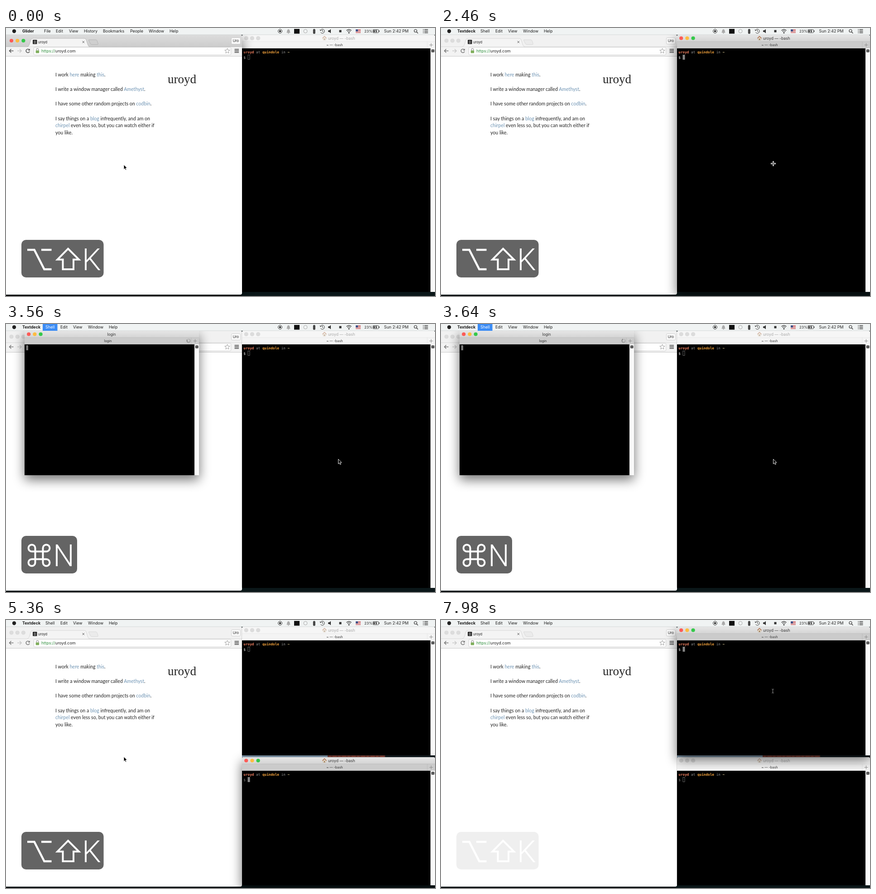
An HTML page that plays this animation: 947x592 px, repeating every 8 s.

```html
<!DOCTYPE html>
<html lang="en">
<head>
<meta charset="utf-8">
<title>Tiling windows</title>
<style>
html, body { margin: 0; width: 100%; height: 100%; overflow: hidden; background: #0b1719; }
svg { display: block; width: 947px; height: 592px; }
text { font-family: Inter, "Open Sans", sans-serif; white-space: pre; }
.page { font-family: Lato, sans-serif; font-size: 10.6px; fill: #222; }
.page .a { fill: #6d93b3; }
.logo { font-family: "Liberation Serif", serif; font-size: 27px; fill: #222; }
.mono { font-family: "DejaVu Sans Mono", monospace; font-size: 7.7px; }
.key { font-family: Roboto, sans-serif; font-weight: 300; font-size: 66px; fill: #fff; }
</style>
</head>
<body>
<svg id="stage" viewBox="0 0 947 592" xmlns="http://www.w3.org/2000/svg"></svg>
<script>
const LOOP = 8000;
const USER = 'uroyd', HOST = 'quindole', APP = 'Glider', SHELL = 'Textdeck';
const stage = document.getElementById('stage');

const DEFS = `<defs>
<filter id="blur" x="-30%" y="-30%" width="160%" height="160%"><feGaussianBlur stdDeviation="13"/></filter>
<linearGradient id="bar" x2="0" y2="1"><stop stop-color="#e6e6e6"/><stop offset="1" stop-color="#d3d3d3"/></linearGradient>
<linearGradient id="strip" x2="0" y2="1"><stop stop-color="#dcdcdc"/><stop offset="1" stop-color="#cdcdcd"/></linearGradient>
</defs>`;

const rect = (x, y, w, h, fill, more = '') =>
  `<rect x="${x}" y="${y}" width="${w}" height="${h}" fill="${fill}" ${more}/>`;
const disc = (x, y, r, fill, more = '') => `<circle cx="${x}" cy="${y}" r="${r}" fill="${fill}" ${more}/>`;
const line = (d, color, w = 1, fill = 'none') =>
  `<path d="${d}" fill="${fill}" stroke="${color}" stroke-width="${w}"/>`;
const text = (x, y, size, str, fill = '#222', more = '') =>
  `<text x="${x}" y="${y}" font-size="${size}" fill="${fill}" ${more}>${str}</text>`;
const mid = 'text-anchor="middle"';

const shadow = (x, y, w, h, on) => on
  ? rect(x, y + 10, w, h, '#000', 'opacity=".55" filter="url(#blur)"')
  : rect(x - 1, y, w + 2, h + 1, '#000', 'opacity=".12" rx="4"');

const lights = (x, y, on) => ['#fc5b57', '#fdbc40', '#34c84a']
  .map((c, i) => disc(x + 13.2 * i, y, 4.1, on ? c : '#dcdcdc', on ? '' : 'stroke="#cfcfcf" stroke-width=".5"')).join('');

function desktop() {
  return rect(0, 0, 947, 592, '#0b1719') + rect(521, 296, 189, 9, '#8299ad') +
    rect(710, 296, 127, 9, '#6b3a34') +
    line('M712 301H836', '#a0503f', 1.5).replace('/>', ' stroke-dasharray="5 4 9 3"/>') +
    rect(837, 296, 110, 9, '#141d21');
}

function browser(on) {
  const ink = on ? '#555' : '#7c7c7c';
  let s = shadow(0, 15, 521, 574, on) + rect(-4, 15, 525, 574, '#fff', 'rx="4"') +
    `<path d="M0 15H517Q521 15 521 19V41H0Z" fill="${on ? 'url(#strip)' : '#f1f1f1'}"/>` +
    rect(0, 41, 521, 21, '#f3f3f3') + line('M0 41.3H521', on ? '#aaa' : '#cfcfcf', .7) +
    line('M0 62.4H521', '#b9b9b9', .8) +
    line('M47 41.6Q50 41 51 38L55 26Q56 23 59 23H173Q176 23 177 26L181 38Q182 41 185 41.6', on ? '#aaa' : '#cacaca', .7, '#f4f4f4') +
    line('M183 26H198Q200 26 201 28L203 34Q204 36.5 202 36.5H189Q187 36.5 186 34L183 28Q182 26 183 26Z', on ? '#aaa' : '#d0d0d0', .7, on ? '#cfcfcf' : '#ebebeb') +
    lights(12, 28, on) +
    rect(59, 26, 9.5, 9.5, '#2b2b2b', 'rx="1"') + text(63.8, 33.5, 7, '0', '#fff', mid) +
    text(71, 33.7, 7.5, USER) + line('M168.6 28.7L173 33.2M173 28.7L168.6 33.2', '#555', 1) +
    rect(497.5, 21.5, 20, 14, '#fafafa', 'rx="2" stroke="#c0c0c0" stroke-width=".7"') +
    text(507.4, 31.2, 7.8, 'Uro', '#222', mid);
  s += line('M16.5 50.5H8M11.5 46.5L7.5 50.5L11.5 54.5', ink, 1.6) +
    line('M25 50.5H33.5M30 46.5L34 50.5L30 54.5', '#c9c9c9', 1.6) +
    line('M51.5 48.2A4 4 0 1 0 52 51.7', ink, 1.6) + `<path d="M52.8 45.5V49.8H48.5Z" fill="${ink}"/>` +
    rect(61.5, 42.5, 435, 17, '#fff', 'rx="2" stroke="#c4c4c4" stroke-width=".8"') +
    rect(65.7, 49.5, 7.4, 6, '#7fae5b', 'rx="1"') + line('M67 50V47.8A2.4 2.4 0 0 1 71.8 47.8V50', '#999', 1.2) +
    `<text x="78" y="53.8" font-size="9" fill="#222"><tspan fill="#2f8f3d">https://</tspan>${USER}.com</text>` +
    line('M488.5 44.8L490.1 48.7L494.2 49L491 51.6L492.1 55.6L488.5 53.4L484.9 55.6L486 51.6L482.8 49L486.9 48.7Z', '#888', .8) +
    line('M504.5 47.2H514M504.5 50.5H514M504.5 53.8H514', '#555', 1.8);
  const link = w => `<tspan class="a">${w}</tspan>`;
  const rows = [
    [106.8, `I work ${link('here')} making ${link('this')}.`],
    [139, `I write a window manager called ${link('Amethyst')}.`],
    [171.3, `I have some other random projects on ${link('codbin')}.`],
    [203.5, `I say things on a ${link('blog')} infrequently, and am on`],
    [219.3, `${link('chirpel')} even less so, but you can watch either if`],
    [235, 'you like.']
  ];
  s += rows.map(([y, t]) => `<text class="page" x="109" y="${y}">${t}</text>`).join('');
  return s + `<text class="logo" x="357" y="122">${USER}</text>`;
}

// A shell window; "login" is its state before the prompt is ready.
function shellWin({ x, y, w, h, on, login, dim, t }) {
  const r = x + w, cx = x + w / 2, tint = on ? '#333' : '#a9a9a9';
  let s = shadow(x, y, w, h, on) + rect(x, y, w, h, '#fff', 'rx="4"') +
    `<path d="M${x} ${y + 16}V${y + 4}q0 -4 4 -4H${r - 4}q4 0 4 4V${y + 16}Z" fill="${on ? 'url(#bar)' : '#f6f6f6'}"/>` +
    rect(x, y + 15, w, 15, on ? '#cbcbcb' : '#f4f4f4') +
    line(`M${x} ${y + 15}H${r}M${r - 17} ${y + 15}V${y + 30}`, on ? '#b2b2b2' : '#dedede', .6) +
    rect(x, y + 30, w - 10, h - 30, '#000') + rect(r - 10, y + 30, 10, h - 30, '#fafafa') +
    lights(x + 9.2, y + 7.5, on) +
    line(`M${r - 12.5} ${y + 22.5}h8m-4 -4v8`, '#888', .9) +
    rect(r - 8, y + 32.5, 6.5, 6, '#222', 'rx="1"') +
    line(`M${r - 7} ${y + 34.5}h4.5m-4.5 2h4.5`, '#ddd', .7);
  if (login) {
    for (let i = 0; i < 10; i++) {
      const a = i * 36 + Math.floor(t / 60) * 36;
      s += `<path d="M0 -2.5V-4.8" transform="translate(${r - 23} ${y + 22}) rotate(${a})" stroke="#333" stroke-width="1" opacity="${.15 + i * .08}"/>`;
    }
    return s + text(cx - .5, y + 10.6, 8.4, 'login', tint, mid) + text(cx - 8.5, y + 25, 7.2, 'login', '#222', mid) +
      rect(x + 3.5, y + 32, 4.5, 11, '#777');
  }
  const hx = cx - 31;
  s += `<g opacity="${on ? 1 : .5}">` + rect(hx - 3, y + 7, 6, 4.5, '#eee3cf', 'stroke="#a58d70" stroke-width=".5"') +
    line(`M${hx - 4.5} ${y + 7.7}l4.5 -4.5l4.5 4.5`, '#b06a42', 1.3) + rect(hx - 1, y + 8.5, 2, 3, '#8d6844') + '</g>' +
    text(cx - 23, y + 10.6, 8.5, `${USER} — -bash`, tint) +
    text(cx - 8.5, y + 25, 7.2, '~ — -bash', '#333', mid) +
    `<text class="mono" x="${x + 3.3}" y="${y + 41}"><tspan fill="#f08060" font-weight="bold">${USER}</tspan>` +
    `<tspan fill="#999"> at </tspan><tspan fill="#f5a33c" font-weight="bold">${HOST}</tspan>` +
    `<tspan fill="#999"> in </tspan><tspan fill="#ecd9a0" font-weight="bold">~</tspan></text>` +
    `<text class="mono" x="${x + 3.3}" y="${y + 52.5}" fill="${dim ? '#777' : '#eee'}">$</text>`;
  return s + (on ? rect(x + 12.5, y + 44, 5, 11, '#858585')
    : rect(x + 13, y + 44.5, 4, 10, 'none', 'stroke="#777" stroke-width=".8"'));
}

const MENUS = {
  [APP]: [['File', 84], ['Edit', 110], ['View', 139], ['History', 172], ['Bookmarks', 214], ['People', 274], ['Window', 315], ['Help', 361]],
  [SHELL]: [['Shell', 87], ['Edit', 120], ['View', 148], ['Window', 181], ['Help', 227]]
};

function menuBar(app, flash) {
  let s = rect(0, 0, 947, 15, '#f0f3f3') + line('M0 14.8H947', '#c2c8c8', .6) + disc(18, 7, 4.2, '#222') +
    text(36, 10.3, 8.9, app, '#1c1c1c', 'font-weight="700"');
  if (flash) s += rect(81, 0, 32.5, 15, '#3b8cf5');
  for (const [name, x] of MENUS[app]) s += text(x, 10.3, 8.9, name, flash && name === 'Shell' ? '#fff' : '#1c1c1c');
  const ink = '#333';
  s += disc(605, 7, 4.4, 'none', `stroke="${ink}"`) + rect(603, 5, 4, 4, ink) +
    `<path d="M619 10.5Q620.5 9 620.5 6Q621 3 623.5 2.5Q626 3 626.5 6Q626.5 9 628 10.5Z" fill="#aaa"/>` + disc(623.5, 11.3, 1.2, '#aaa') +
    rect(636, 2, 12, 10.5, '#111') + disc(661, 7, 4, 'none', 'stroke="#aaa"') +
    rect(677.8, 2, 5, 11, '#444', 'rx="2.5"') +
    line('M694.3 5A4.6 4.6 0 1 1 694.5 9.5M693 3.5L694.2 6L696.5 5M698.5 4V7.2L700.5 8.5', ink, 1) +
    `<path d="M711 5.3H713.5L717 2.5V11.5L713.5 8.7H711Z" fill="${ink}"/>` + rect(735.5, 4.5, 5, 5, ink) +
    line('M751.5 5.6Q757 .8 762.5 5.6M753.5 7.9Q757 4.8 760.5 7.9', ink, 1.3) + disc(757, 10.4, 1.5, ink) +
    rect(772, 3, 11, 8, '#f3efef') + line('M772 3.6H783M772 5.9H783M772 8.2H783M772 10.5H783', '#c64a4e', 1.1) + rect(772, 3, 5, 4.5, '#3e4f86') +
    text(791, 10.2, 8.2, '23%', '#222') +
    rect(810, 3.5, 12.5, 7, 'none', `rx="1" stroke="${ink}" stroke-width=".9"`) + rect(811.2, 4.7, 3, 4.6, ink) +
    `<path d="M818 2.5L814.5 7.5H817L816 11.5L820 6.2H817.5Z" fill="${ink}"/>` + rect(823.2, 5.5, 1.3, 3, ink) +
    text(834.5, 10.3, 8.9, 'Sun 2:42 PM', '#222') +
    disc(904, 6.2, 3, 'none', `stroke="${ink}" stroke-width="1.1"`) + line('M906.2 8.5L909.5 11.7', ink, 1.3) +
    line('M920.5 3.5H922M923.5 3.5H931.5M920.5 7H922M923.5 7H931.5M920.5 10.5H922M923.5 10.5H931.5', ink, 1.3);
  return s;
}

// Shown from, fading from, key.
const KEYS = [[-900, 535, 'K'], [1080, 2490, 'K'], [3200, 4440, 'N'], [5000, 6260, 'K'], [6560, 7764, 'K']];
const FADE = 240;

function keyCaps(t) {
  const k = KEYS.find(([a, b]) => t >= a && t < b + FADE);
  if (!k) return '';
  const alpha = Math.min(1, 1 - (t - k[1]) / FADE);
  const caps = k[2] === 'N'
    ? line('M64.5 495A7.5 7.5 0 1 0 57 502.5H89A7.5 7.5 0 1 0 81.5 495V527A7.5 7.5 0 1 0 89 519.5H57A7.5 7.5 0 1 0 64.5 527Z', '#fff', 4) +
      '<text class="key" x="104" y="535">N</text>'
    : line('M47 490H62.5L84.5 533H100.5M78 490H100.5', '#fff', 4.5) +
      line('M137 487.5L161 511.5H149V533H125.5V511.5H113.5Z', '#fff', 4) +
      '<text class="key" x="168" y="535">K</text>';
  return `<g opacity="${alpha.toFixed(3)}">${rect(34, 468, k[2] === 'N' ? 123 : 181.5, 83, '#646464', 'rx="10"')}${caps}</g>`;
}

const POINTER = [[0, 'arrow', 260, 302], [1300, 'arrow', 733.5, 298.5], [1500, 'plus', 733.5, 299.5],
  [3480, 'arrow', 733.5, 298.5], [5320, 'arrow', 260, 302], [6780, 'arrow', 733.5, 156.5], [6940, 'beam', 732.5, 157]];
const SHAPES = {
  arrow: line('M0 0V10.5L2.4 8.3L4 12L5.8 11.2L4.2 7.6H7.5Z', '#fff', .9, '#000'),
  plus: line('M-5.5 0H5.5M0 -5.5V5.5', '#ddd', 3) + line('M-4.5 0H4.5M0 -4.5V4.5', '#444', 1),
  beam: line('M-2 -4.5Q0 -4.5 0 -3V3Q0 4.5 -2 4.5M2 -4.5Q0 -4.5 0 -3M0 3Q0 4.5 2 4.5', '#aaa', .9)
};

function pointer(t) {
  const [, shape, x, y] = POINTER.filter(p => t >= p[0]).pop();
  return `<g transform="translate(${x} ${y})">${SHAPES[shape]}</g>`;
}

const FOCUS = [[0, 'web'], [1380, 'top'], [3540, 'new'], [5400, 'web'], [6840, 'top']];
const TILED = 3780;

function scene(t) {
  const focus = FOCUS.filter(f => t >= f[0]).pop()[1];
  const tiled = t >= TILED;
  const wins = {
    web: browser(focus === 'web'),
    top: shellWin({ x: 521, y: 15, w: 426, h: tiled ? 284 : 568, on: focus === 'top' })
  };
  if (t >= 3540) {
    const box = tiled ? { x: 521, y: t < 4160 ? 302 : 303, w: 426, h: 283 } : { x: 41, y: 15, w: 385, h: 319, login: true };
    wins.new = shellWin({ ...box, on: focus === 'new', dim: true, t });
  }
  const order = Object.keys(wins).filter(k => k !== focus).concat(focus);
  return DEFS + desktop() + order.map(k => wins[k]).join('') +
    menuBar(focus === 'web' ? APP : SHELL, t >= 3500 && t < 3660) + keyCaps(t) + pointer(t);
}

let last = '';
const start = performance.now();
function draw(now) {
  const next = scene(Math.max(0, now - start) % LOOP);
  if (next !== last) stage.innerHTML = last = next;
  requestAnimationFrame(draw);
}
draw(start);
</script>
</body>
</html>
```
